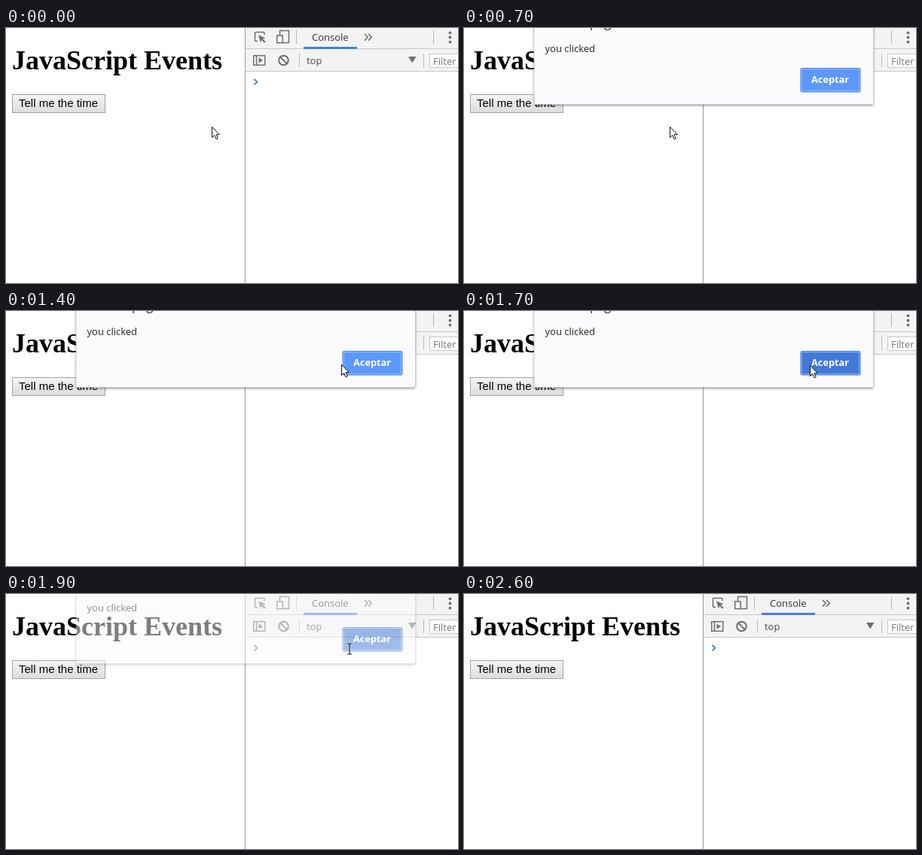
An HTML page for the animation above (2.7 s loop, 600x339 px).

```html
<!DOCTYPE html>
<html lang="en">
<head>
<meta charset="utf-8">
<title>JavaScript Events</title>
<style>
  html, body { margin: 0; width: 100%; height: 100%; overflow: hidden; background: #fff; }
  svg { display: block; width: 100vw; height: 100vh; }
  .ui { font: 13px "Open Sans", "Noto Sans", sans-serif; }
  .icon { fill: none; stroke: #6e6e6e; stroke-width: 1.5; }
  .rule { fill: none; stroke: #c8c8c8; }
</style>
</head>
<body>
<svg viewBox="0 0 600 339">
  <defs>
    <linearGradient id="face" x2="0" y2="1">
      <stop stop-color="#f5f5f5"/><stop offset="1" stop-color="#dcdcdc"/>
    </linearGradient>
    <filter id="shade" x="-5%" y="-10%" width="110%" height="125%">
      <feDropShadow dx="0" dy="1.5" stdDeviation="1.4" flood-color="#000" flood-opacity=".38"/>
    </filter>
  </defs>
  <rect width="600" height="339" fill="#fff"/>

  <!-- page -->
  <text x="8" y="55" font-family="'Liberation Serif', 'Times New Roman', serif" font-size="36" font-weight="700">JavaScript Events</text>
  <rect x="8.5" y="88.5" width="123" height="24" fill="url(#face)" stroke="#a3a3a3"/>
  <text x="17" y="105" font-family="'Liberation Sans', Arial, sans-serif" font-size="15">Tell me the time</text>

  <!-- developer tools -->
  <rect x="318" width="282" height="57" fill="#f3f3f3"/>
  <path class="rule" d="M318 27.5H600M318 57.5H600"/>
  <path class="rule" d="M385.5 3V21M567.5 3V21M389.5 34V52M554.5 34V52" style="stroke:#b8b8b8"/>
  <path d="M317.5 0V339" stroke="#9a9a9a"/>
  <rect x="395" y="25" width="71" height="3" fill="#3f82e4"/>
  <g class="icon">
    <path d="M334 17.5H332Q330.5 17.5 330.500 16V7Q330.500 5.500 332 5.500H341.500Q343 5.500 343 7V9"/>
    <path d="M335 9.500L344.500 13.200L340.800 14.500L344.500 18.300L343 19.800L339.300 16L338 19.500Z" fill="#6e6e6e" stroke="none"/>
    <path d="M363.500 9V3.500H375.500V19.500H368"/>
    <rect x="359.700" y="10" width="7.500" height="9.700"/>
    <path d="M476 8L480.300 12.300L476 16.600M481 8L485.300 12.300L481 16.600"/>
    <rect x="328.700" y="36.700" width="15" height="12.600"/>
    <path d="M332.500 37V49"/>
    <path d="M335.500 39.500L341 43L335.500 46.500Z" fill="#6e6e6e" stroke="none"/>
    <g id="clear" stroke-width="2"><circle cx="368.500" cy="43" r="6.300"/><path d="M364 38.500L373 47.500"/></g>
  </g>
  <g fill="#6e6e6e">
    <circle cx="589.500" cy="6.300" r="1.900"/><circle cx="589.500" cy="12.500" r="1.900"/><circle cx="589.500" cy="18.700" r="1.900"/>
    <path d="M534 38H544.500L539.200 46.500Z"/>
  </g>
  <rect x="562.500" y="34.500" width="50" height="18" fill="#fff" stroke="#c8c8c8"/>
  <g class="ui">
    <text x="406" y="17" fill="#333">Console</text>
    <text x="399" y="48" fill="#4c4c4c">top</text>
    <text x="567" y="49" fill="#757575">Filter</text>
  </g>
  <path d="M329.500 68L333.500 71.700L329.500 75.400" fill="none" stroke="#3f85d8" stroke-width="1.900"/>

  <!-- alert -->
  <g id="alert">
    <rect x="93" y="-30" width="450.500" height="131.500" rx="2" fill="#fbfafd" stroke="#b5b5b5" stroke-width=".6" filter="url(#shade)"/>
    <g class="ui">
      <text x="107" y="-1" style="font-size:16.500px" fill="#222">En esta página</text>
      <text x="107.500" y="32" fill="#222">you clicked</text>
      <rect id="ok" x="447" y="53.500" width="79" height="31.500" rx="1.500" stroke="#3f7fe6"/>
      <rect x="448.200" y="54.700" width="76.600" height="29.100" fill="none" stroke="#a9c8ff" stroke-width=".8"/>
      <text x="461" y="73" style="font-size:12.800px;font-weight:700" fill="#fff">Aceptar</text>
    </g>
  </g>

  <path id="arrow" d="M.5 .5V14.500L3.700 11.500L6 16.800L8.200 15.800L6 10.700H10.300Z" fill="#fff" stroke="#111"/>
  <g id="beam" fill="none">
    <path d="M-3 -7H-1L0 -6L1 -7H3M0 -6V6M-3 7H-1L0 6L1 7H3" stroke="#fff" stroke-width="2.400" opacity=".6"/>
    <path d="M-3 -7H-1L0 -6L1 -7H3M0 -6V6M-3 7H-1L0 6L1 7H3" stroke="#222" stroke-width="1.200"/>
  </g>
</svg>
<script>
  const LOOP = 2700, STEP = 100;
  const el = id => document.getElementById(id);
  const clearIcon = el("clear"), alertBox = el("alert"), ok = el("ok");
  const arrow = el("arrow"), beam = el("beam");

  // pointer stops: time, x, y
  const stops = [
    [0, 273, 131], [800, 273, 131], [1300, 443, 71], [1400, 445, 71],
    [1700, 459, 72], [1800, 460.5, 74.5], [1900, 456, 73],
    [2100, 368, 44], [2200, 260.5, 22.5], [2400, 236, 2], [2500, 230, -16]
  ];
  // alert stops: time, vertical shift, opacity
  const slide = [
    [400, -22, 0], [500, -18, 0.06], [600, -6, 0.6], [700, 0, 1],
    [1700, 0, 1], [1800, -1.5, 1], [1900, -9, 0.5], [2000, -18, 0.06], [2100, -22, 0]
  ];

  const ease = u => u * u * (3 - 2 * u);

  function sample(keys, t, curve = u => u) {
    if (t <= keys[0][0]) return keys[0].slice(1);
    const i = keys.findIndex(k => k[0] >= t);
    if (i < 0) return keys[keys.length - 1].slice(1);
    const a = keys[i - 1], b = keys[i];
    const u = curve((t - a[0]) / (b[0] - a[0]));
    return [a[1] + (b[1] - a[1]) * u, a[2] + (b[2] - a[2]) * u];
  }

  const show = (node, on) => node.setAttribute("visibility", on ? "visible" : "hidden");

  function draw(ms) {
    const t = Math.floor((ms % LOOP) / STEP) * STEP;
    const [x, y] = sample(stops, t, ease);
    const [dy, alpha] = sample(slide, t);
    const place = `translate(${x} ${y})`;

    alertBox.setAttribute("transform", `translate(0 ${dy})`);
    alertBox.setAttribute("opacity", alpha);
    ok.setAttribute("fill", t >= 1700 ? "#4279d8" : "#5c98ff");
    clearIcon.style.stroke = t >= 2100 && t < 2400 ? "#333" : "#6e6e6e";

    arrow.setAttribute("transform", place);
    beam.setAttribute("transform", place);
    show(arrow, t < 1800);
    show(beam, t >= 1800 && t < 2500);
  }

  const start = performance.now();
  function tick() {
    draw(performance.now() - start);
    requestAnimationFrame(tick);
  }
  tick();
</script>
</body>
</html>
```
